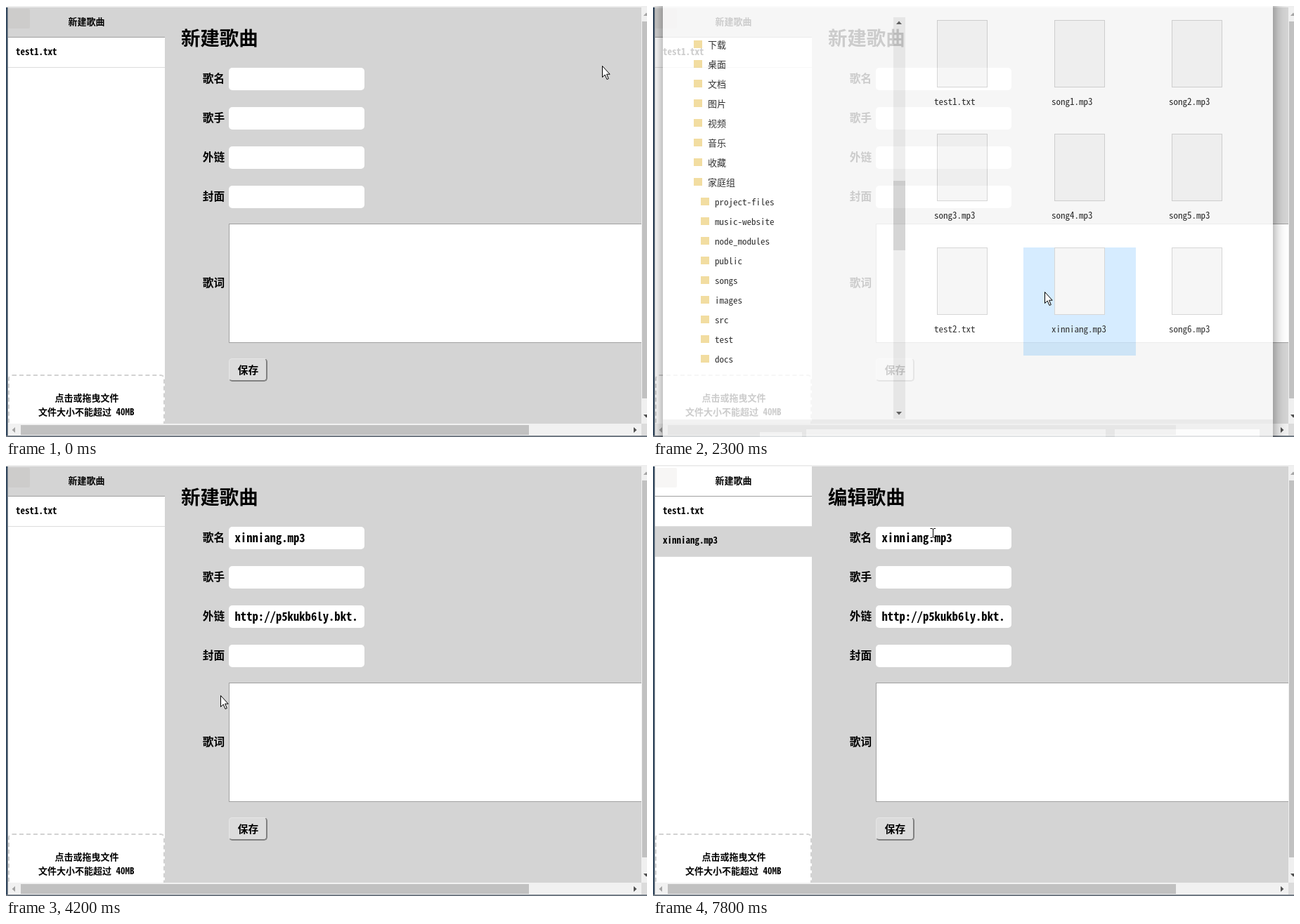
An HTML page for the animation above (8000 ms loop, 912 by 614 pixels).

```html
<!DOCTYPE html>
<html lang="zh-CN">
<head>
<meta charset="utf-8">
<title>新建歌曲</title>
<style>
html, body { margin: 0; width: 100%; height: 100%; overflow: hidden; background: #d4d4d4; }
#stage { position: absolute; inset: 0; width: 912px; height: 614px; overflow: hidden;
  font-family: "Noto Sans Mono CJK SC", "Noto Sans CJK SC", "Liberation Mono", monospace; font-weight: bold; }
#stage div { position: absolute; box-sizing: border-box; white-space: pre; }
#stage .thin { font-weight: normal; }
svg { position: absolute; left: 0; top: 0; overflow: visible; }
</style>
</head>
<body>
<div id="stage"></div>
<script>
const stage = document.getElementById('stage');
const GREY = '#d4d4d4';

function box(x, y, w, h, css = '', parent = stage) {
  const el = document.createElement('div');
  el.style.cssText = `left:${x}px;top:${y}px;width:${w}px;height:${h}px;${css}`;
  return parent.appendChild(el);
}

// Text starts at x and is centred vertically on y.
function text(x, y, size, content, parent = stage) {
  const el = box(x, y - 20, 300, 40, `font-size:${size}px;line-height:40px`, parent);
  el.textContent = content;
  return el;
}

function arrow(x, y, angle, color, parent = stage) {
  box(x - 4, y - 4, 8, 8,
    `background:${color};clip-path:polygon(50% 20%,100% 75%,0 75%);transform:rotate(${angle}deg)`, parent);
}

function show(el, visible) {
  el.style.display = visible ? '' : 'none';
}

// Window edges and sidebar
box(0, 0, 3, 614, 'background:linear-gradient(90deg,#34495f 0 2px,#8b939b 2px)');
box(0, 0, 912, 2, 'background:#eee');
box(3, 45, 223, 550, 'background:#fff');
const header = box(3, 2, 223, 43, 'border-bottom:1px solid #a0a0a0');
box(3, 4, 31, 28, 'background:rgba(60,50,20,.045);border-radius:2px');
text(88.5, 22, 13, '新建歌曲');

function listRow(y, h, name) {
  const row = box(3, y, 223, h, 'border-bottom:1px solid #ddd');
  text(11, 65 - 46, 13, name, row);
  return row;
}
const rows = [listRow(46, 42, 'test1.txt'), listRow(88, 43, 'xinniang.mp3')];

const drop = box(3, 525, 223, 70, 'overflow:hidden;background:#fff');
box(0, 0, 223, 90, 'border:2px dashed #d2d2d2;border-radius:6px', drop);
text(69.5, 558, 13, '点击或拖曳文件');
text(46, 577.5, 13, '文件大小不能超过 40MB');

// Form
const title = text(249, 43.5, 27.4, '');
const fields = ['歌名', '歌手', '外链', '封面'].map((label, i) => {
  const y = 88 + 56 * i;
  text(279.8, y + 15, 15.7, label);
  box(317, y, 193, 32, 'background:#fff;border-radius:5px');
  return text(325.5, y + 14.5, 16.7, '');
});
text(279.8, 394, 15.7, '歌词');
box(317, 310, 600, 170, 'background:#fff;border:1px solid #a0a0a0');
box(317, 502, 55, 33,
  'background:#dcdcdc;border:solid;border-width:1px 2px 2px 1px;border-color:#e6e6e6 #808080 #808080 #e6e6e6;border-radius:5px');
text(329.7, 517.5, 14.7, '保存');

// Upload indicator
const loader = box(3, 3, 901, 592, 'background:rgba(0,0,0,.2)');
const disc = box(450.5, 295.5, 0, 0, 'background:green;border-radius:50%;transform:translate(-50%,-50%)', loader);

// Browser scrollbars
box(904, 2, 8, 593, 'background:#f0f0f0');
box(905, 22, 7, 537, 'background:#c1c1c1');
arrow(911, 12, 0, '#a5a5a5');
arrow(911, 584, 180, '#505050');
box(3, 595, 901, 17, 'background:#f1f1f1');
box(21, 597, 723, 14, 'background:#c1c1c1');
arrow(11, 604, -90, '#a3a3a3');
arrow(895, 604, 90, '#505050');
box(904, 595, 8, 17, 'background:#dcdcdc');
box(0, 612, 912, 2, 'background:#707983');

// File chooser
const dialog = box(14, -20, 868, 660, 'background:#fff;box-shadow:0 0 18px rgba(0,0,0,.6)');
const files = box(0, 20, 868, 588, '', dialog);
files.className = 'thin';

function folder(x, y, name) {
  box(x, y - 6, 12, 11, 'background:#efd58a', files);
  text(x + 20, y, 13, name, files);
}
['下载', '桌面', '文档', '图片', '视频', '音乐', '收藏', '家庭组']
  .forEach((name, i) => folder(44, 55 + 28 * i, name));
['project-files', 'music-website', 'node_modules', 'public', 'songs', 'images', 'src', 'test', 'docs']
  .forEach((name, i) => folder(54, 279 + 28 * i, name));

const selection = box(513, 344, 160, 154, 'background:#cce8ff', files);
['test1.txt', 'song1.mp3', 'song2.mp3', 'song3.mp3', 'song4.mp3', 'song5.mp3', 'test2.txt', 'xinniang.mp3', 'song6.mp3']
  .forEach((name, i) => {
    const x = 390 + 167 * (i % 3), y = 20 + 162 * Math.floor(i / 3);
    box(x, y, 72, 96, 'background:#f5f5f5;border:1px solid #ccc', files);
    text(x - 4, y + 116, 13, name, files);
  });
box(328, 36, 17, 572, 'background:#ebebeb', dialog);
box(328, 269, 17, 99, 'background:#cbcbcb', dialog);
arrow(336, 44, 0, '#444', dialog);
arrow(336, 600, 180, '#444', dialog);
box(0, 609, 868, 51, 'background:#f0f0f0', dialog);
box(204, 623, 426, 30, 'background:#fff', dialog);
box(643, 623, 206, 30, 'background:#fff', dialog);
box(138, 627, 60, 20, 'background:#fff', dialog);

// Pointer shapes
const svg = document.createElementNS('http://www.w3.org/2000/svg', 'svg');
svg.setAttribute('width', 1);
svg.setAttribute('height', 1);
svg.innerHTML = `
  <path d="M.5.5V16.5L4.2 13L7 19.5L9.3 18.5L6.6 12.2H11.2Z" fill="#fff" stroke="#000"/>
  <path d="M-3.5.5H-1L.5 1.5L2 .5H4M.5 1.5V13M-3.5 13.5H-1L.5 12.5L2 13.5H4" fill="none" stroke="#000"/>`;
stage.appendChild(svg);
const [pointer, beam] = svg.children;

// time, x, y
const path = [
  [0, 848, 85], [700, 125, 560], [900, 125, 560], [1300, 685, 561], [1700, 640, 480],
  [1800, 640, 480], [2100, 582, 410], [2200, 582, 410], [2700, 346, 385], [2800, 346, 385],
  [3300, 305, 328], [4500, 305, 328], [4900, 390, 205], [5400, 345, 524], [5500, 345, 524],
  [6300, 120, 105], [6400, 120, 105], [6700, 140, 61], [7000, 140, 61], [7300, 109, 80],
  [7400, 102, 102], [7500, 102, 102], [7800, 398, 90], [8000, 398, 90]
];

function cursorAt(t) {
  const i = path.findIndex(key => key[0] > t);
  const [t0, x0, y0] = path[i - 1], [t1, x1, y1] = path[i];
  const p = (t - t0) / (t1 - t0), ease = p * p * (3 - 2 * p);
  return [x0 + (x1 - x0) * ease, y0 + (y1 - y0) * ease].map(Math.round);
}

const overField = (x, y) => x > 317 && x < 510 && y > 85 && y < 280 && (y - 85) % 56 < 32;
const clamp = v => Math.max(0, Math.min(1, v));

function render(t) {
  const editing = t >= 6500;
  const first = t >= 6900 && t < 7600;
  const filled = editing || (t >= 4200 && t < 5500);
  title.textContent = editing ? '编辑歌曲' : '新建歌曲';
  header.style.backgroundColor = editing ? '#fff' : GREY;
  fields[0].textContent = !filled ? '' : first ? 'test1.txt' : 'xinniang.mp3';
  fields[2].textContent = filled ? 'http://p5kukb6ly.bkt.' : '';
  rows[0].style.backgroundColor = first ? GREY : '#fff';
  rows[1].style.backgroundColor = editing && !first ? GREY : '#fff';
  show(rows[1], t >= 5500);

  show(loader, t >= 2900 && t < 4200);
  const size = 90 + 30 * Math.sin(Math.PI / 6 + (t - 3700) / 1000 * 2 * Math.PI);
  disc.style.width = disc.style.height = size + 'px';

  dialog.style.opacity = clamp((t - 900) / 500) * clamp((2700 - t) / 500);
  show(files, t >= 1400);
  show(selection, t >= 2000);

  const [x, y] = cursorAt(t);
  const typing = overField(x, y) && t > 2900;
  svg.style.transform = `translate(${x}px,${y}px)`;
  show(pointer, !typing);
  show(beam, typing);
}

const start = performance.now();
function tick() {
  const t = (performance.now() - start) % 8000;
  render(Math.floor(t / 100) * 100);
  requestAnimationFrame(tick);
}
tick();
</script>
</body>
</html>
```
